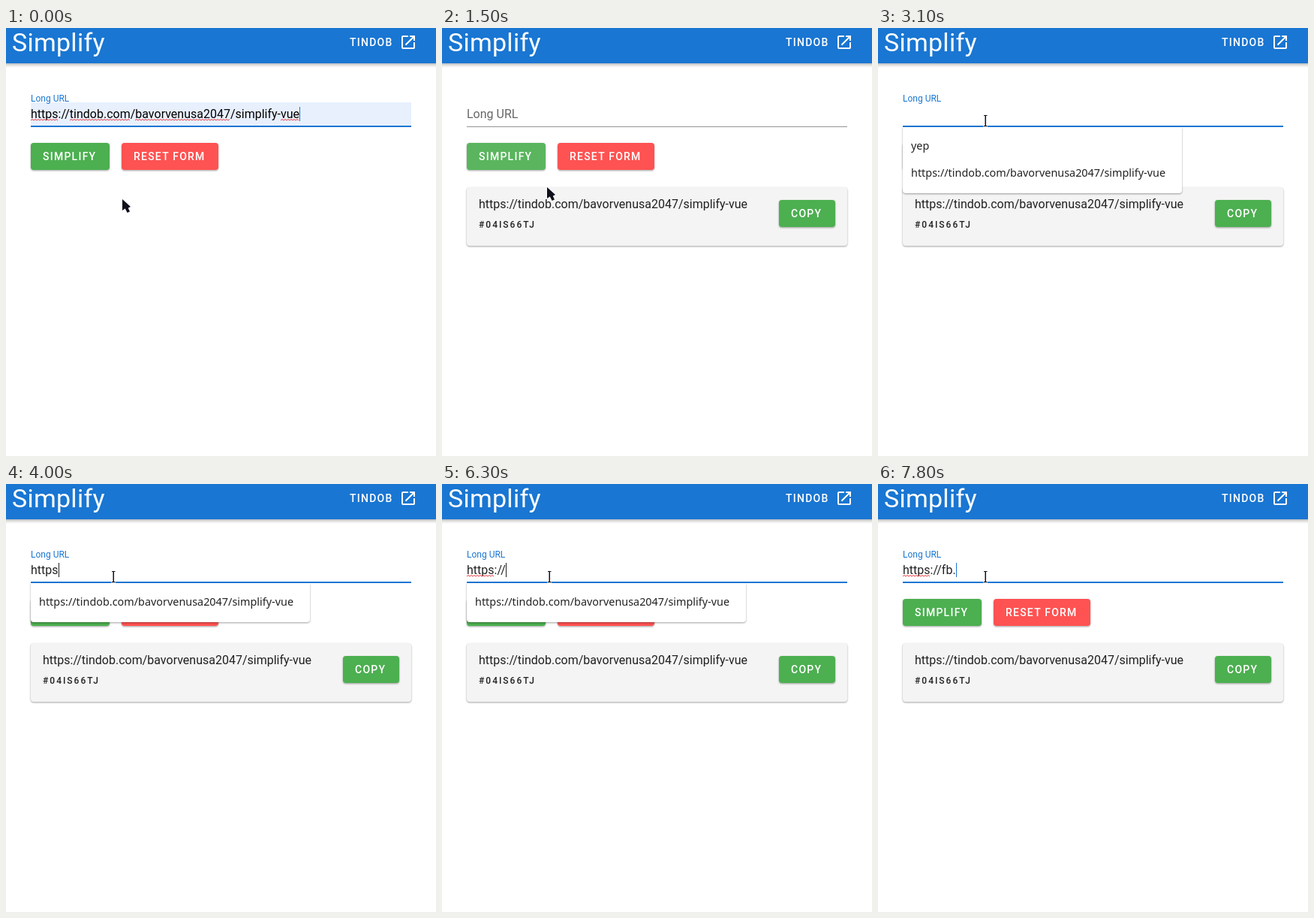
Recreate the animation shown at these times as an HTML page. Size 573 by 570 pixels, loop 8000 ms.

```html
<!DOCTYPE html>
<html lang="en">
<head>
<meta charset="utf-8">
<title>Simplify</title>
<style>
html, body { margin: 0; width: 100%; height: 100%; overflow: hidden; background: #fff; }
svg { display: block; width: 573px; height: 570px; font: 16px Roboto, sans-serif; }
text { white-space: pre; }
.ink { fill: rgba(0,0,0,.87); }
.btn { font-size: 14px; font-weight: 500; letter-spacing: 1.25px; fill: #fff; }
.code { font-size: 12px; font-weight: 500; letter-spacing: 2px; }
.menu text { font: 14.4px "Noto Sans", sans-serif; fill: #222; }
.low { filter: drop-shadow(0 1px 1px rgba(0,0,0,.24)) drop-shadow(0 1px 1px rgba(0,0,0,.14)); }
.high { filter: drop-shadow(0 3px 2px rgba(0,0,0,.24)) drop-shadow(0 3px 4px rgba(0,0,0,.2)); }
.bar { filter: drop-shadow(0 2px 2px rgba(0,0,0,.3)); }
.cursor path { fill: #10101c; stroke: #fff; stroke-width: 1.4; paint-order: stroke; stroke-linejoin: round; }
</style>
</head>
<body>
<svg viewBox="0 0 573 570">
  <defs><clipPath id="clip"><rect x="33" y="153" width="105" height="36" rx="4"/></clipPath></defs>

  <rect class="bar" x="-20" y="-20" width="613" height="67" fill="#1976d2"/>
  <text x="8" y="31" font-size="34" letter-spacing=".25" fill="#fff">Simplify</text>
  <text class="btn" x="458" y="24">TINDOB</text>
  <path transform="translate(524 7)" fill="#fff" d="M14 3V5H17.59L7.76 14.83L9.17 16.24L19 6.41V10H21V3M19 19H5V5H12V3H5C3.89 3 3 3.9 3 5V19A2 2 0 0 0 5 21H19A2 2 0 0 0 21 19V12H19V19Z"/>

  <rect id="fill" x="33" y="99" width="507" height="32" fill="#e8f0fe"/>
  <text id="label" y="15">Long URL</text>
  <text id="value" x="33" y="120"></text>
  <path id="wave" fill="none" stroke="#e8383d" stroke-width="1"/>
  <rect id="caret" y="105" width="1" height="19"/>
  <rect id="base" x="33" y="131" width="507" height="1"/>
  <rect id="line" y="130" height="2"/>

  <rect id="send" x="33" y="153" width="105" height="36" rx="4" fill="#4caf50"/>
  <g clip-path="url(#clip)" fill="#fff">
    <rect id="hover" x="33" y="153" width="105" height="36"/>
    <circle id="ripple" cx="85.5" cy="171"/>
  </g>
  <text class="btn" x="49" y="176">SIMPLIFY</text>
  <rect class="low" x="154" y="153" width="129" height="36" rx="4" fill="#ff5252"/>
  <text class="btn" x="170" y="176">RESET FORM</text>

  <g id="card">
    <rect class="low" x="33" y="212" width="507" height="78" rx="4" fill="#f4f4f4"/>
    <text class="ink url" x="49" y="240"></text>
    <text class="ink code" x="49" y="266">#04IS66TJ</text>
    <rect class="low" x="449" y="229" width="75" height="36" rx="4" fill="#4caf50"/>
    <text class="btn" x="465" y="252">COPY</text>
  </g>

  <g id="menu" class="menu">
    <path id="sheet" class="low" fill="#fff"/>
    <text id="yep" x="44" y="162">yep</text>
    <text id="entry" class="url" x="44"></text>
  </g>

  <g id="cursor" class="cursor">
    <path id="arrow" d="M0 0V15L3.8 12.4L6.6 18L10 16.4L7.8 11.8L11 10Z"/>
    <path id="hand" d="M4.5 1.5Q6 -.5 7.5 1.5L8.5 7L14 8.5Q17 9.5 16.5 12L15.5 16V20H7L1 12Q0 10 2 10L5.5 11.5Z"/>
    <path id="beam" d="M-2 -8H2.5V-7H1V6H2.5V7H-2V6H-.5V-7H-2Z"/>
  </g>
</svg>
<script>
const LOOP = 8000, STEP = 100, BLUE = '#1976d2', INK = 'rgba(0,0,0,.87)';
const URL_TEXT = 'https://tindob.com/bavorvenusa2047/simplify-vue';
const $ = id => document.getElementById(id);
const set = (id, attrs) => {
  for (const k in attrs) $(id).setAttribute(k, attrs[k]);
};
const show = (id, on) => set(id, { display: on ? 'inline' : 'none' });
const at = (list, t) => list.filter(k => k[0] <= t).pop();
const clamp = u => Math.max(0, Math.min(1, u));
const ease = (t, start, dur) => 1 - (1 - clamp((t - start) / dur)) ** 3;

const typed = [
  [0, URL_TEXT], [1000, ''], [3200, 'h'], [3400, 'ht'], [3500, 'htt'], [3600, 'http'],
  [4000, 'https'], [4200, 'https;'], [4400, 'https;/'], [5200, 'https;'], [5400, 'https'],
  [6000, 'https:'], [6200, 'https:/'], [6300, 'https://'], [6900, 'https://f'],
  [7200, 'https://fb'], [7700, 'https://fb.']
];
const carets = [
  [0, BLUE], [100, ''], [3200, INK], [5200, ''], [5800, INK], [7800, BLUE]
];
const menus = [[0, 0], [3100, 88], [3200, 52], [4200, 0], [5400, 52], [6900, 0]];
const waves = [
  [0, [[33, 70], [85, 166], [172, 298], [366, 390]]], [800, []],
  [4600, [[33, 73]]], [5400, []], [6300, [[33, 70]]]
];
const moves = [
  [0, 'arrow', 155, 228], [100, 'arrow', 150, 215], [200, 'arrow', 139, 192],
  [300, 'hand', 120, 168], [500, 'hand', 77, 167], [1500, 'arrow', 140, 212],
  [1600, 'arrow', 141, 209], [1700, 'arrow', 142, 203], [1800, 'arrow', 143, 192],
  [1900, 'arrow', 143, 175], [2000, 'arrow', 143, 154], [2100, 'beam', 143, 132],
  [2200, 'beam', 143, 124]
];

function wavePath(spans) {
  let d = '';
  for (const [a, b] of spans) {
    d += `M${a} 123`;
    for (let x = a + 2, up = true; x <= b; x += 2, up = !up) d += `L${x} ${up ? 121.5 : 123}`;
  }
  return d;
}

function drawField(t) {
  const focus = t < 800 || t >= 2500;
  const filled = t < 1000;
  const lift = t < 2000 ? 1 - ease(t, 950, 300) : ease(t, 2450, 250);
  const grow = t < 2000 ? 1 - ease(t, 735, 300) : ease(t, 2450, 250);
  const color = at(carets, t)[1];
  show('fill', filled);
  set('label', {
    transform: `translate(33 ${105 - 18 * lift}) scale(${1 - .25 * lift})`,
    fill: focus ? BLUE : 'rgba(0,0,0,.6)'
  });
  $('value').textContent = at(typed, t)[1];
  set('value', { fill: filled ? '#000' : INK });
  set('wave', { d: wavePath(at(waves, t)[1]) });
  show('caret', color);
  set('caret', {
    x: Math.round(33 + $('value').getComputedTextLength()),
    fill: color || INK
  });
  set('base', { fill: t >= 2100 ? INK : 'rgba(0,0,0,.42)' });
  set('line', {
    x: 286.5 - 253.5 * grow, width: 507 * grow, fill: focus ? BLUE : INK
  });
}

function drawButton(t) {
  const pressed = t >= 800 && t < 1100;
  const fade = 1 - clamp((t - 900) / 400);
  set('send', { class: pressed ? 'high' : 'low' });
  set('hover', { opacity: t < 800 || t >= 1600 ? 0 : .08 + .12 * fade });
  set('ripple', { r: t < 800 ? 0 : t < 900 ? 28 : 51, opacity: .28 * fade });
}

function drawMenu(t) {
  const h = at(menus, t)[1];
  const y = 132 + h;
  show('menu', h);
  show('yep', h > 60);
  set('sheet', { d: `M33 132H405V${y - 4}Q405 ${y} 401 ${y}H37Q33 ${y} 33 ${y - 4}Z` });
  set('entry', { y: y - 22 });
}

function drawCursor(t) {
  const [, kind, x, y] = at(moves, t);
  for (const id of ['arrow', 'hand', 'beam']) show(id, id === kind);
  set('cursor', { transform: `translate(${x} ${y})` });
}

function draw(time) {
  const t = Math.floor(time % LOOP / STEP) * STEP;
  drawField(t);
  drawButton(t);
  show('card', t >= 1000);
  drawMenu(t);
  drawCursor(t);
}

document.querySelectorAll('.url').forEach(el => { el.textContent = URL_TEXT; });
let start;
function tick(now) {
  start ??= now;
  draw(now - start);
  requestAnimationFrame(tick);
}
draw(0);
requestAnimationFrame(tick);
</script>
</body>
</html>
```
